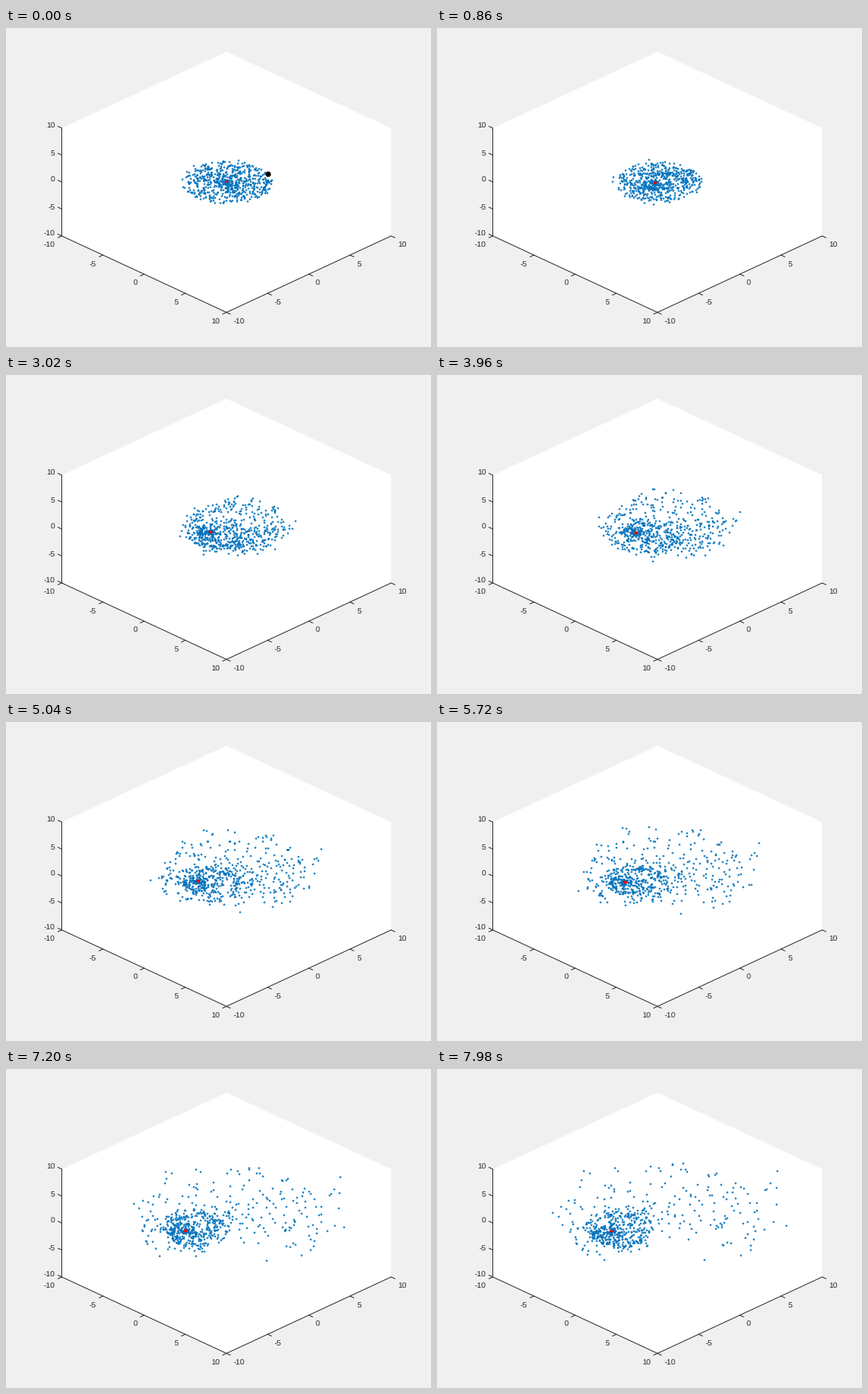
Recreate the animation shown at these times as a matplotlib script. Size 560 by 420 pixels, loop 8000 ms.

```python
import numpy as np
import matplotlib.pyplot as plt
from matplotlib.animation import FuncAnimation

W, H, DPI = 560, 420, 100
FRAMES, INTERVAL, SUBSTEPS = 400, 20, 4
PX = 72 / DPI                       # one pixel in points
BG, INK, BLUE = "#f0f0f0", "#262626", "#0072bd"
LIM = 10

# gravity model: core with a disc of test particles, intruder through its centre
N, RADIUS, THICKNESS, NOISE = 620, 3.95, 0.12, 0.08
GM_CORE, SOFT_CORE = 20.0, 0.3
GM_INTRUDER, SOFT_INTRUDER = 18.0, 0.6
INTRUDER_START, INTRUDER_SPEED = 5.0, 18.4
CORE_SPEED, KICK_TIME, KICK_WIDTH = 0.742, 0.37, 0.06
AXIS = np.array([1.0, 0.0, 1.0])    # both heavy bodies move along this line

plt.rcParams["text.hinting"] = "none"


def project(p):
    """Data coordinates to stage pixels."""
    x, y, z = np.moveaxis(np.asarray(p, float), -1, 0)
    return 290 + 10.85 * (x + y), 202.3 + 5.03 * (x - y) - 7.1 * z


def depth(p):
    """Nearness to the viewer."""
    return 0.612 * (p[..., 0] - p[..., 1]) + 0.5 * p[..., 2]


def core_at(t):
    s = KICK_WIDTH * np.logaddexp(0, (t - KICK_TIME) / KICK_WIDTH)
    return -CORE_SPEED * s * AXIS


def intruder_at(t):
    return (INTRUDER_START - INTRUDER_SPEED * t) * AXIS


def pull(pos, centre, gm, soft):
    d = centre - pos
    return gm * d / ((d ** 2).sum(1, keepdims=True) + soft ** 2) ** 1.5


def accel(pos, t):
    return (pull(pos, core_at(t), GM_CORE, SOFT_CORE)
            + pull(pos, intruder_at(t), GM_INTRUDER, SOFT_INTRUDER))


def simulate():
    rng = np.random.default_rng(7)
    r = np.maximum(RADIUS * rng.random(N) ** 0.75, 0.25)
    a = rng.uniform(0, 2 * np.pi, N)
    speed = r * np.sqrt(GM_CORE / (r ** 2 + SOFT_CORE ** 2) ** 1.5)
    pos = np.column_stack([r * np.cos(a), r * np.sin(a),
                           rng.normal(0, THICKNESS, N)])
    vel = speed[:, None] * (np.column_stack([-np.sin(a), np.cos(a), 0 * a])
                            + rng.normal(0, NOISE, (N, 3)))

    dt = INTERVAL / 1000 / SUBSTEPS
    track = np.empty((FRAMES, N, 3))
    t, acc = 0.0, accel(pos, 0.0)
    for i in range(FRAMES):
        track[i] = pos
        for _ in range(SUBSTEPS):
            vel = vel + acc * dt / 2
            pos = pos + vel * dt
            t += dt
            acc = accel(pos, t)
            vel = vel + acc * dt / 2
    return track


fig = plt.figure(figsize=(W / DPI, H / DPI), dpi=DPI, facecolor=BG)
ax = fig.add_axes([0, 0, 1, 1])
ax.set_xlim(-0.5, W - 0.5)
ax.set_ylim(H - 0.5, -0.5)
ax.axis("off")


def stroke(points):
    ax.plot(*project(points), color=INK, lw=PX, solid_capstyle="butt",
            solid_joinstyle="miter", zorder=1)


def tick(point, dx, dy, label_x, label_y, ha, value):
    x, y = project(point)
    ax.plot([x, x + dx], [y, y + dy], color=INK, lw=PX, zorder=1)
    ax.text(x + label_x, y + label_y + 3.6, str(value), ha=ha, va="baseline",
            family="Liberation Sans", fontsize=10.4 * PX, color=INK)


def draw_box():
    L = LIM
    outline = [(-L, -L, L), (-L, L, L), (L, L, L),
               (L, L, -L), (L, -L, -L), (-L, -L, -L)]
    ax.fill(*project(outline), color="white", lw=0, zorder=0)
    stroke([(-L, -L, L), (-L, -L, -L), (L, -L, -L), (L, L, -L)])
    for v in range(-L, L + 1, 5):
        tick((v, -L, -L), -5, 2.3, -9, 11.5, "right", v)
        tick((L, v, -L), 5, 2.3, 9, 11.5, "left", v)
        tick((-L, -L, v), -5, -2.3, -9, -3.2, "right", v)


def dots(color, size, z):
    return ax.plot([], [], "o", color=color, ms=size * PX, mew=0, zorder=z)[0]


draw_box()
track = simulate()
far, near = dots(BLUE, 2.5, 2), dots(BLUE, 2.5, 4)
core = dots("red", 5.4, 3)
intruder = dots("black", 7.2, 5)


def draw(i):
    t = i * INTERVAL / 1000
    pos, centre, guest = track[i], core_at(t), intruder_at(t)
    front = depth(pos) > depth(centre)
    far.set_data(*project(pos[~front]))
    near.set_data(*project(pos[front]))
    core.set_data(*project(centre[None]))
    intruder.set_data(*project(guest[None]))
    intruder.set_zorder(5 if guest[0] > 0 else 1.5)
    intruder.set_visible(bool(abs(guest[0]) <= LIM))
    return far, near, core, intruder


anim = FuncAnimation(fig, draw, frames=FRAMES, interval=INTERVAL,
                     repeat=True, repeat_delay=0, blit=False)
plt.show()
```
